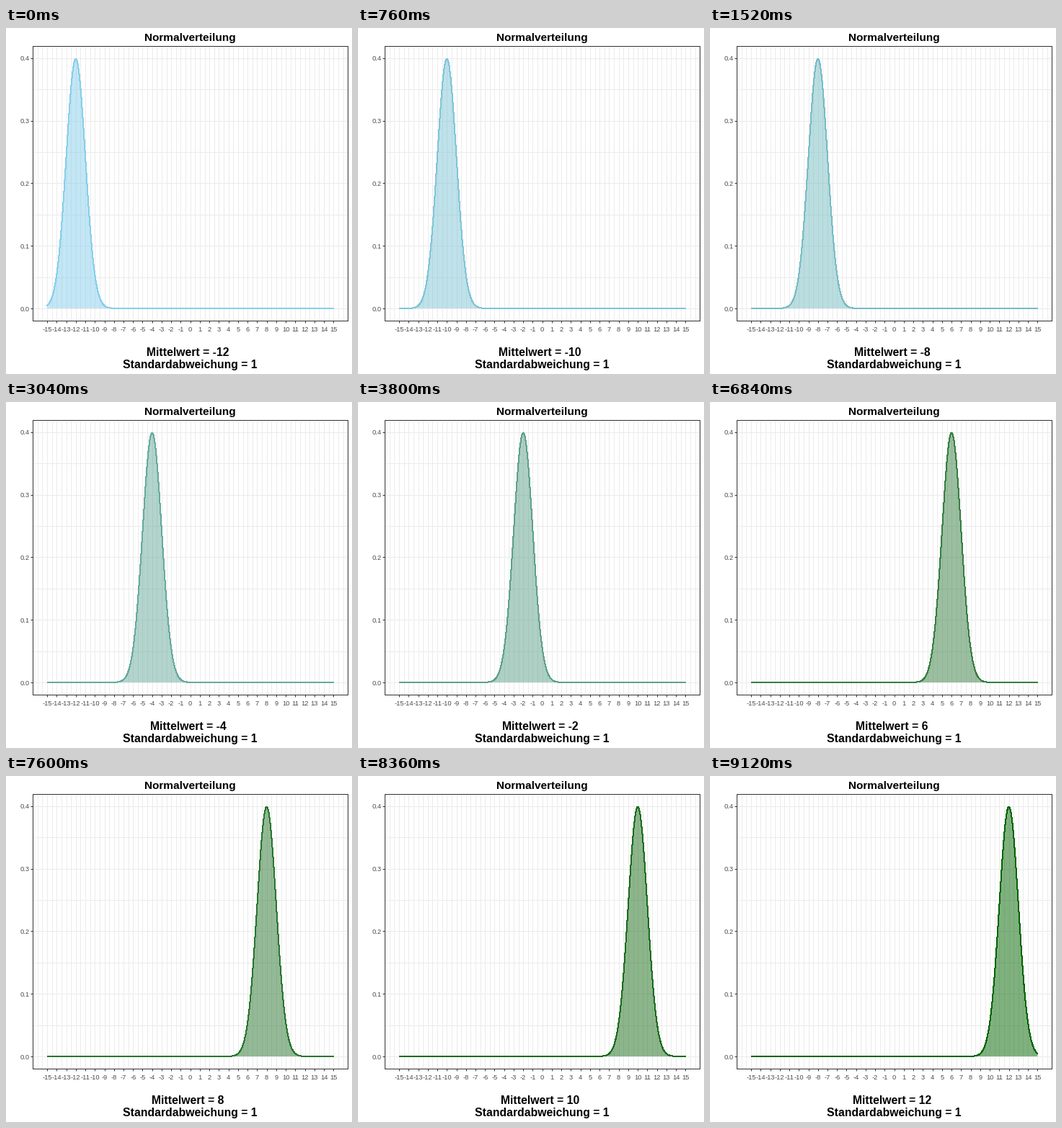
These frames come from a looping animation (480x480 px, 9880 ms). A matplotlib script:

```python
import numpy as np
import matplotlib.pyplot as plt
from matplotlib.animation import FuncAnimation

SIZE = 480
MEANS = np.arange(-12, 13, 2)
PANEL = (37.2, 25.3, 474.2, 406.3)  # left, top, right, bottom in pixels
PEAK = 1 / np.sqrt(2 * np.pi)

RGB_TO_XYZ = np.array([[0.4124, 0.3576, 0.1805],
                       [0.2126, 0.7152, 0.0722],
                       [0.0193, 0.1192, 0.9505]])
WHITE = RGB_TO_XYZ.sum(axis=1)
SKY_BLUE = np.array([135, 206, 235]) / 255
DARK_GREEN = np.array([0, 100, 0]) / 255


def rgb_to_lab(rgb):
    linear = np.where(rgb > 0.04045, ((rgb + 0.055) / 1.055) ** 2.4, rgb / 12.92)
    ratio = RGB_TO_XYZ @ linear / WHITE
    fx, fy, fz = np.where(ratio > 0.008856, np.cbrt(ratio), 7.787 * ratio + 16 / 116)
    return np.array([116 * fy - 16, 500 * (fx - fy), 200 * (fy - fz)])


def lab_to_rgb(lab):
    fy = (lab[0] + 16) / 116
    f = np.array([fy + lab[1] / 500, fy, fy - lab[2] / 200])
    ratio = np.where(f > 0.2069, f ** 3, (f - 16 / 116) / 7.787)
    linear = np.clip(np.linalg.solve(RGB_TO_XYZ, ratio * WHITE), 0, 1)
    rgb = np.where(linear > 0.0031308, 1.055 * linear ** (1 / 2.4) - 0.055, 12.92 * linear)
    return np.clip(rgb, 0, 1)


def blend(t):
    start, end = rgb_to_lab(SKY_BLUE), rgb_to_lab(DARK_GREEN)
    return lab_to_rgb(start + t * (end - start))


plt.rcParams["font.family"] = "Liberation Sans"
fig = plt.figure(figsize=(SIZE / 72, SIZE / 72), dpi=72, facecolor="white")


def label(x, y, text, size, **style):
    """Place text with its baseline at pixel (x, y), measured from the top left."""
    return fig.text(x / SIZE, 1 - y / SIZE, text, fontsize=size, va="baseline", **style)


def heading(x, y, text, size=15.8):
    return label(x, y, text, size, ha="center", weight="bold", color="black")


left, top, right, bottom = PANEL
ax = fig.add_axes([left / SIZE, 1 - bottom / SIZE,
                   (right - left) / SIZE, (bottom - top) / SIZE])
ax.set_xlim(-16.5, 16.5)
ax.set_ylim(-0.05 * PEAK, 1.05 * PEAK)

x_ticks = np.arange(-15, 16)
y_ticks = np.arange(5) / 10
ax.set_xticks(x_ticks)
ax.set_xticks(np.arange(-16, 16.5, 0.5), minor=True)
ax.set_yticks(y_ticks)
ax.set_yticks(np.arange(0.05, 0.4, 0.1), minor=True)
ax.set_axisbelow(True)
ax.grid(which="both", color="#EBEBEB", linewidth=1)
ax.tick_params(which="major", length=2.75, width=1, color="#333333",
               labelbottom=False, labelleft=False)
ax.tick_params(which="minor", length=0)
for spine in ax.spines.values():
    spine.set(color="#333333", linewidth=1)

tick_style = dict(size=9.3, color="#4D4D4D")
for tick in x_ticks:
    px = left + (tick + 16.5) / 33 * (right - left)
    label(px, 421, str(tick), ha="center", **tick_style)
for tick in y_ticks:
    py = bottom - (tick / PEAK + 0.05) / 1.1 * (bottom - top)
    label(32.5, py + 3.8, f"{tick:.1f}", ha="right", **tick_style)

heading(255, 18, "Normalverteilung", 15.4)
mean_text = heading(252.6, 455, "")
heading(255, 472, "Standardabweichung = 1")

# An aliased stroke fills every pixel it touches, so width 1 shows as two pixels.
x = np.linspace(-15, 15, 601)
area, = ax.fill(x, 0 * x, alpha=0.5, linewidth=0, zorder=2)
curve, = ax.plot(x, 0 * x, linewidth=1, antialiased=False,
                 solid_capstyle="butt", zorder=2.2)


def draw(i):
    mean = MEANS[i]
    y = PEAK * np.exp(-(x - mean) ** 2 / 2)
    color = blend(i / (len(MEANS) - 1))
    area.set_xy(np.column_stack([np.r_[x[0], x, x[-1]], np.r_[0, y, 0]]))
    area.set_facecolor(color)
    curve.set_ydata(y)
    curve.set_color(color)
    mean_text.set_text(f"Mittelwert = {mean}")
    return area, curve, mean_text


anim = FuncAnimation(fig, draw, frames=len(MEANS), interval=760,
                     repeat=True, repeat_delay=0)
plt.show()
```
